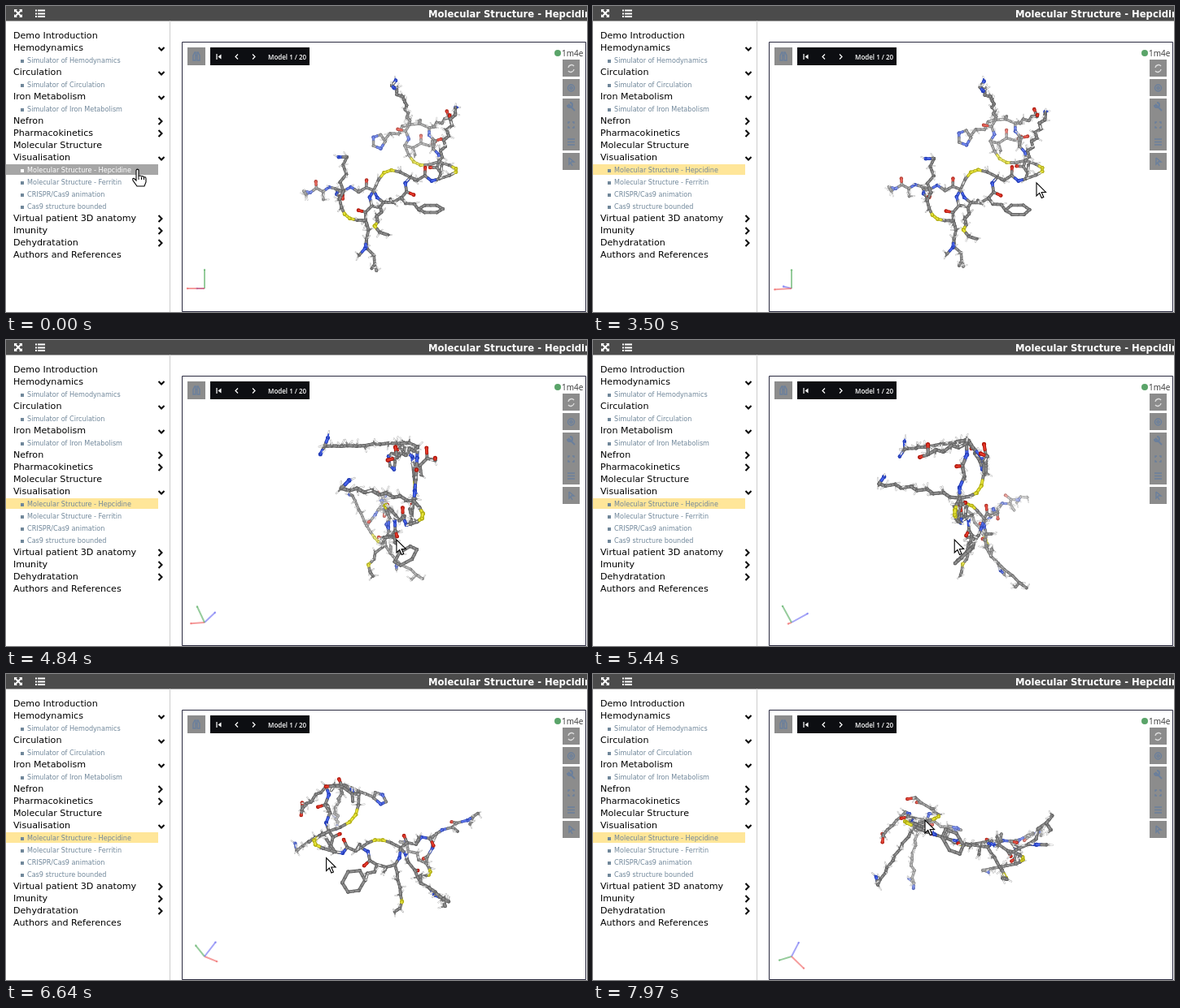
Recreate the animation shown at these times as an HTML page with a canvas. Size 714 px wide and 377 px high, loop 8 s.

```html
<!DOCTYPE html>
<html lang="en">
<head>
<meta charset="utf-8">
<title>Molecule viewer</title>
<style>
  html, body { margin: 0; width: 100%; height: 100%; overflow: hidden; background: #fff; }
  svg, canvas { position: absolute; left: 0; top: 0; width: 714px; height: 377px; }
  text { font-family: "DejaVu Sans", sans-serif; white-space: pre; }
  .ui { font-family: "Open Sans", sans-serif; }
</style>
</head>
<body>
<svg id="page" viewBox="0 0 714 377">
  <rect width="714" height="18.500" fill="#4b4b4b"/>
  <path d="M11 5l8 8M19 5l-8 8" stroke="#fff" stroke-width="2"/>
  <path d="M10 4h4l-4 4zM20 4h-4l4 4zM10 14h4l-4-4zM20 14h-4l4-4z" fill="#fff"/>
  <path d="M36 5.500h2m1 0h9M36 9.500h2m1 0h9M36 13h2m1 0h9" stroke="#fff" stroke-width="2"/>
  <text x="519" y="14" font-size="11.600" font-weight="700" fill="#fff">Molecular Structure - Hepcidine</text>
  <path d="M201.500 18V377" stroke="#ccc"/>
  <rect id="row" y="195" width="187" height="13"/>
  <g id="menu"></g>
  <path d="M216.500 44.500H712.500V376.500H216.500z" fill="none" stroke="#2b2b40"/>

  <g fill="#8c8c8c">
    <rect x="223" y="51" width="22" height="22"/>
    <rect x="684" y="66" width="21" height="21"/>
    <rect x="684" y="90" width="21" height="21"/>
    <rect x="684" y="114" width="21" height="64"/>
    <rect x="684" y="181" width="21" height="21"/>
  </g>
  <g fill="none" stroke="#6a7f9c" stroke-width="1.400">
    <path d="M230 67V61l2-4h1v10zM238 67V61l-2-4h-1v10zM233 61h2"/>
    <path d="M691 76a4 4 0 0 1 7-2M698 78a4 4 0 0 1-7 2" stroke="#ddd"/>
    <circle cx="694.500" cy="101" r="4"/><circle cx="694.500" cy="101" r="1.500"/>
    <path d="M691 121l8 8M690 122a3 3 0 1 0 3-3" stroke-width="2"/>
    <path d="M691 145v-2h2M696 143h2v2M698 148v2h-2M693 150h-2v-2"/>
    <path d="M690 164h9M690 167.500h9M690 171h9"/>
    <path d="M692 187v8l2-2 2 4M692 187l6 5h-4"/>
  </g>
  <rect x="251" y="51" width="122" height="22" fill="#0d0e12"/>
  <g fill="none" stroke="#fff" stroke-width="1.200">
    <path d="M259 59v7M285 59.500l-3 3 3 3M303 59.500l3 3-3 3"/>
    <path d="M264.500 59.500v6l-4-3z" fill="#fff" stroke="none"/>
  </g>
  <text class="ui" x="322" y="66" font-size="8" font-weight="600" fill="#fff">Model 1 / 20</text>
  <circle cx="678" cy="58" r="4" fill="#5aa469"/>
  <text class="ui" x="683" y="62" font-size="10" fill="#333">1m4e</text>

  <g id="info">
    <rect x="486" y="352" width="219" height="17" fill="#0d0e12"/>
    <text class="ui" y="365" font-size="7" fill="#5b96d8"><tspan x="493">1M4E | Model 1 | Instance 1_555 |</tspan><tspan x="602" font-size="9.500" font-weight="600">A</tspan><tspan x="610">|</tspan><tspan x="614" font-size="9.500" font-weight="600">CYS 5</tspan><tspan x="639">[+ 1 other Residue]</tspan></text>
  </g>
</svg>
<canvas id="scene" width="714" height="377"></canvas>
<script>
const $ = id => document.getElementById(id);
const ctx = $('scene').getContext('2d');
const LOOP = 8000, CX = 465, CY = 213, CAMERA = 500, BOND = 10, WHITE = [255, 255, 255];

// Menu: "v" expanded, ">" collapsed, "-" child entry
const entries = ['Demo Introduction', 'vHemodynamics', '-Simulator of Hemodynamics',
  'vCirculation', '-Simulator of Circulation', 'vIron Metabolism', '-Simulator of Iron Metabolism',
  '>Nefron', '>Pharmacokinetics', 'Molecular Structure', 'vVisualisation',
  '-Molecular Structure - Hepcidine', '-Molecular Structure - Ferritin', '-CRISPR/Cas9 animation',
  '-Cas9 structure bounded', '>Virtual patient 3D anatomy', '>Imunity', '>Dehydratation',
  'Authors and References'];
$('menu').innerHTML = entries.map((entry, i) => {
  const y = 37 + 15 * i, label = entry.replace(/^[v>-]/, '');
  if (entry[0] === '-') return `<g fill="#70879a"><rect x="18" y="${y - 1}" width="4" height="4"/>
    <text x="26" y="${y + 3}" font-size="8.100">${label}</text></g>`;
  const arrow = { v: `M187.500 ${y - 1}l3.500 3.500 3.500-3.500`, '>': `M187.500 ${y - 4}l4 4-4 4` }[entry[0]];
  return `<text x="9" y="${y + 3}" font-size="11.100">${label}</text>` +
    (arrow ? `<path d="${arrow}" fill="none" stroke="#000" stroke-width="2"/>` : '');
}).join('');
const activeItem = $('menu').querySelectorAll('g')[3];

const dot = (a, b) => a[0] * b[0] + a[1] * b[1] + a[2] * b[2];
const cross = (a, b) => [a[1] * b[2] - a[2] * b[1], a[2] * b[0] - a[0] * b[2], a[0] * b[1] - a[1] * b[0]];
const add = (a, b, k = 1) => a.map((v, i) => v + b[i] * k);
const mix = (a, b, k) => a.map((v, i) => v + (b[i] - v) * k);
const clamp = (v, lo, hi) => Math.min(hi, Math.max(lo, v));

// Rows of the camera rotation: screen right, screen up, toward the viewer
function rotation(...degrees) {
  const [yaw, pitch, roll] = degrees.map(d => d * Math.PI / 180);
  const flat = [Math.cos(yaw), 0, Math.sin(yaw)];
  const tilt = [Math.sin(pitch) * flat[2], Math.cos(pitch), -Math.sin(pitch) * flat[0]];
  const c = Math.cos(roll), s = Math.sin(roll);
  const right = flat.map((v, i) => c * v - s * tilt[i]), up = flat.map((v, i) => s * v + c * tilt[i]);
  return [right, up, cross(right, up)];
}

// Key places of the molecule in the resting view: x, y and depth
const nodes = {
  nTerm: [434, 307, 8], ankle: [443, 288, 6], knee: [442, 264, 10], left: [410, 238, 12], leftTip: [419, 186, 14],
  hub: [452, 227, -8], tail: [405, 225, -25], cTerm: [366, 228, -52],
  core: [464, 242, 6], middle: [486, 236, 8], cys: [497, 211, 0], right: [532, 213, 2],
  trunk: [532, 192, -12], top: [520, 150, -45], shoulder: [496, 146, -45],
  inner: [490, 172, -48], outer: [520, 172, -58], his: [466, 164, -40],
  elbow: [490, 118, 5], argTip: [474, 98, 33], lysTip: [552, 127, 56], acid: [545, 138, -8],
  metBend: [453, 271, 45], met: [469, 282, 50], ile: [453, 318, -8], phe: [507, 251, 18]
};
const colors = { C: [128, 128, 128], N: [48, 80, 235], O: [226, 30, 14], S: [228, 224, 28], H: [215, 215, 215] };
const HYDROGENS = { C: 2, N: 1 };
const home = rotation(203.6, 0, 0);
const atoms = [], bonds = [], placed = {};
let seed = 7, residue = 0;
const random = () => (seed = seed * 16807 % 2147483647) / 2147483647;
function randomDirection() {
  const a = random() * 2 * Math.PI, z = random() * 2 - 1, r = Math.sqrt(1 - z * z);
  return [r * Math.cos(a), r * Math.sin(a), z];
}

// Stores the atom in molecule axes, undoing the perspective of the resting view
function addAtom(el, point, hot = false, bare = false) {
  const [x, y, z] = point, k = 1 - z / CAMERA, seen = [(x - CX) * k, (CY - y) * k, z];
  const body = [0, 1, 2].map(i => seen.reduce((sum, v, row) => sum + v * home[row][i], 0));
  const id = atoms.push({ el, hot, body, point }) - 1;
  if (!bare) for (let i = 0; i < (HYDROGENS[el] || 0); i++) branch(id, 'H', 7);
  return id;
}
function branch(parent, el, length = BOND, direction = randomDirection()) {
  const { point, hot } = atoms[parent], id = addAtom(el, add(point, direction, length), hot);
  bonds.push([parent, id]);
  return id;
}
function nodeAtom(name, el = 'C', hot = false) {
  return placed[name] ??= addAtom(el, nodes[name], hot);
}

// Zigzag of atoms through key places; a backbone repeats N, C with side chain, C with oxygen
function chain(route, { tip = '', backbone = false } = {}) {
  const names = route.split(' ');
  let previous = nodeAtom(names[0]);
  names.slice(1).forEach((name, k) => {
    const a = nodes[names[k]], b = nodes[name], along = add(b, a, -1), length = Math.hypot(...along);
    const steps = Math.max(1, Math.round(length / BOND)), normal = [-along[1] / length, along[0] / length, .4];
    for (let j = 1; j < steps; j++) {
      const kind = backbone ? residue++ % 3 : -1, side = j % 2 ? 1 : -1;
      const id = addAtom(kind === 0 ? 'N' : 'C', add(mix(a, b, j / steps), normal, 3 * side), false, kind === 2);
      bonds.push([previous, id]);
      if (kind === 1) branch(id, 'C');
      if (kind === 2) branch(id, 'O', BOND, normal.map(v => v * side));
      previous = id;
    }
    const id = nodeAtom(name);
    bonds.push([previous, id]);
    previous = id;
  });
  [...tip].forEach(el => branch(previous, el));
}

// Disulfide arc bulging sideways from the straight line
function bridge(from, to, bulge, hot) {
  const a = nodes[from], b = nodes[to], [dx, dy] = add(b, a, -1), length = Math.hypot(dx, dy);
  const normal = [-dy / length, dx / length, 0];
  let previous = nodeAtom(from, 'C', hot);
  [...'CSSC'].forEach((el, i) => {
    const s = (i + 1) / 5;
    const id = addAtom(el, add(mix(a, b, s), normal, bulge * Math.sin(Math.PI * s)), hot);
    bonds.push([previous, id]);
    previous = id;
  });
  bonds.push([previous, nodeAtom(to, 'C', hot)]);
}

function ring(els, center, radii) {
  const first = atoms.length;
  [...els].forEach((el, i) => {
    const a = 2 * Math.PI * i / els.length, trig = [Math.cos(a), Math.sin(a), Math.sin(a)];
    const id = addAtom(el, center.map((v, k) => v + radii[k] * trig[k]), false, true);
    bonds.push([id, first + (i + 1) % els.length]);
  });
}

nodeAtom('metBend', 'S');
bridge('hub', 'cys', -17, true);
bridge('trunk', 'right', -22);
bridge('inner', 'trunk', 14);
bridge('left', 'knee', 11);
chain('nTerm ankle knee', { backbone: true, tip: 'H' });
chain('left tail hub core middle cys right trunk top shoulder inner outer', { backbone: true, tip: 'O' });
chain('hub knee', { backbone: true });
chain('tail cTerm', { backbone: true, tip: 'CC' });
chain('left leftTip', { tip: 'N' });
chain('ankle ile', { tip: 'CC' });
chain('core metBend met');
chain('middle phe');
chain('shoulder elbow argTip', { tip: 'NN' });
chain('shoulder his');
chain('trunk lysTip', { tip: 'N' });
chain('top acid', { tip: 'OO' });
ring('CNCNC', [458, 167, -40], [8, 9, 3]);
ring('CCCCCC', [522, 250, 18], [15, 5, 14]);

// time, pointer x, pointer y, yaw, pitch, roll
const keys = [
  [500, 161, 201, 203.6, 0, 0], [1300, 276, 203, 203.6, 0, 0], [2100, 498, 209, 203.6, 0, 0],
  [2400, 537, 210, 203.6, 0, 0], [2570, 545, 217, 206, 6, 0], [3550, 545, 218, 206, 7, 0],
  [4840, 480, 246, 133, 21, 25], [6100, 405, 246, 66, -20, 33],
  [7240, 381, 205, 74, -65, 45], [7970, 408, 180, 143, -47, 107]
];
function stateAt(t) {
  const next = keys.findIndex(key => key[0] > t);
  if (next < 1) return keys[next ? keys.length - 1 : 0].slice(1);
  const a = keys[next - 1], b = keys[next];
  return mix(a, b, (t - a[0]) / (b[0] - a[0])).slice(1);
}

const rgb = c => `rgb(${c.map(Math.round)})`;
function line(x0, y0, x1, y1, width, color) {
  ctx.lineWidth = width;
  ctx.strokeStyle = color;
  ctx.beginPath();
  ctx.moveTo(x0, y0);
  ctx.lineTo(x1, y1);
  ctx.stroke();
}

function drawMolecule(view, hovering) {
  const seen = atoms.map(({ el, hot, body }) => {
    const [x, y, z] = view.map(row => dot(row, body)), scale = CAMERA / (CAMERA - z);
    const color = hot && hovering ? mix(colors[el], [255, 50, 110], .6) : colors[el];
    return { el, x: CX + x * scale, y: CY - y * scale, z, scale, color: mix(color, WHITE, clamp(-z / 140, 0, .6)) };
  });
  const halves = bonds.flatMap(([i, j]) => {
    const a = seen[i], b = seen[j], width = b.el === 'H' ? 1.7 : 3.6;
    return [[a, b], [b, a]].map(([p, q]) => ({
      p, mx: (p.x + q.x) / 2, my: (p.y + q.y) / 2, z: p.z * .75 + q.z * .25, width: width * p.scale
    }));
  }).sort((a, b) => a.z - b.z);
  ctx.lineCap = 'round';
  for (const { p, mx, my, width } of halves) {
    const dark = rgb(p.color.map(v => v * .78)), light = p.el === 'H' ? '#fff' : rgb(mix(p.color, WHITE, .12));
    line(p.x, p.y, mx, my, width, dark);
    if (p.el !== 'H') line(p.x, p.y, p.x, p.y, width + (p.el === 'C' ? .3 : 1), dark);
    line(p.x, p.y, mx, my, width * .55, light);
  }
}

function drawAxes(view) {
  const tints = ['rgba(238,90,90,.6)', 'rgba(80,170,90,.6)', 'rgba(90,90,240,.55)'];
  ctx.lineCap = 'butt';
  [0, 1, 2].sort((a, b) => view[2][a] - view[2][b]).forEach(k => {
    const x = 244 + 23 * view[0][k], y = 348 - 23 * view[1][k];
    line(244, 348, x, y, 2, tints[k]);
    ctx.fillStyle = tints[k];
    ctx.beginPath();
    ctx.arc(x, y, 1.2, 0, 7);
    ctx.fill();
  });
}

const arrowShape = new Path2D('M0 0V16l3.700-3.500 2.600 6 2.500-1-2.600-6H11.500z');
const handShape = new Path2D('M-1 1.500Q0-1 2 1V9Q4 7 5.500 9 7.500 8 8.500 10 11 9 11 12V16L9 21H0L-5 14Q-6 10-3 12L-1 14z');
function drawPointer(x, y, hand) {
  const shape = hand ? handShape : arrowShape;
  ctx.save();
  ctx.translate(x, y);
  ctx.lineWidth = 1.1;
  ctx.fillStyle = '#fff';
  ctx.strokeStyle = '#000';
  ctx.fill(shape);
  ctx.stroke(shape);
  if (hand) [2, 5.5, 8.5].forEach(dx => line(dx, 10, dx, 13, 1, '#000'));
  ctx.restore();
}

function render(now) {
  const t = now % LOOP, [x, y, ...angles] = stateAt(t), view = rotation(...angles);
  const onMenu = x < 187, hovering = t >= 1900 && t < 2400;
  $('row').setAttribute('fill', onMenu ? '#a6a6a6' : '#ffe699');
  activeItem.setAttribute('fill', onMenu ? '#fff' : '#70879a');
  $('info').style.visibility = hovering ? 'visible' : 'hidden';
  ctx.clearRect(0, 0, 714, 377);
  drawMolecule(view, hovering);
  drawAxes(view);
  drawPointer(x, y, onMenu);
  requestAnimationFrame(render);
}
requestAnimationFrame(render);
</script>
</body>
</html>
```
